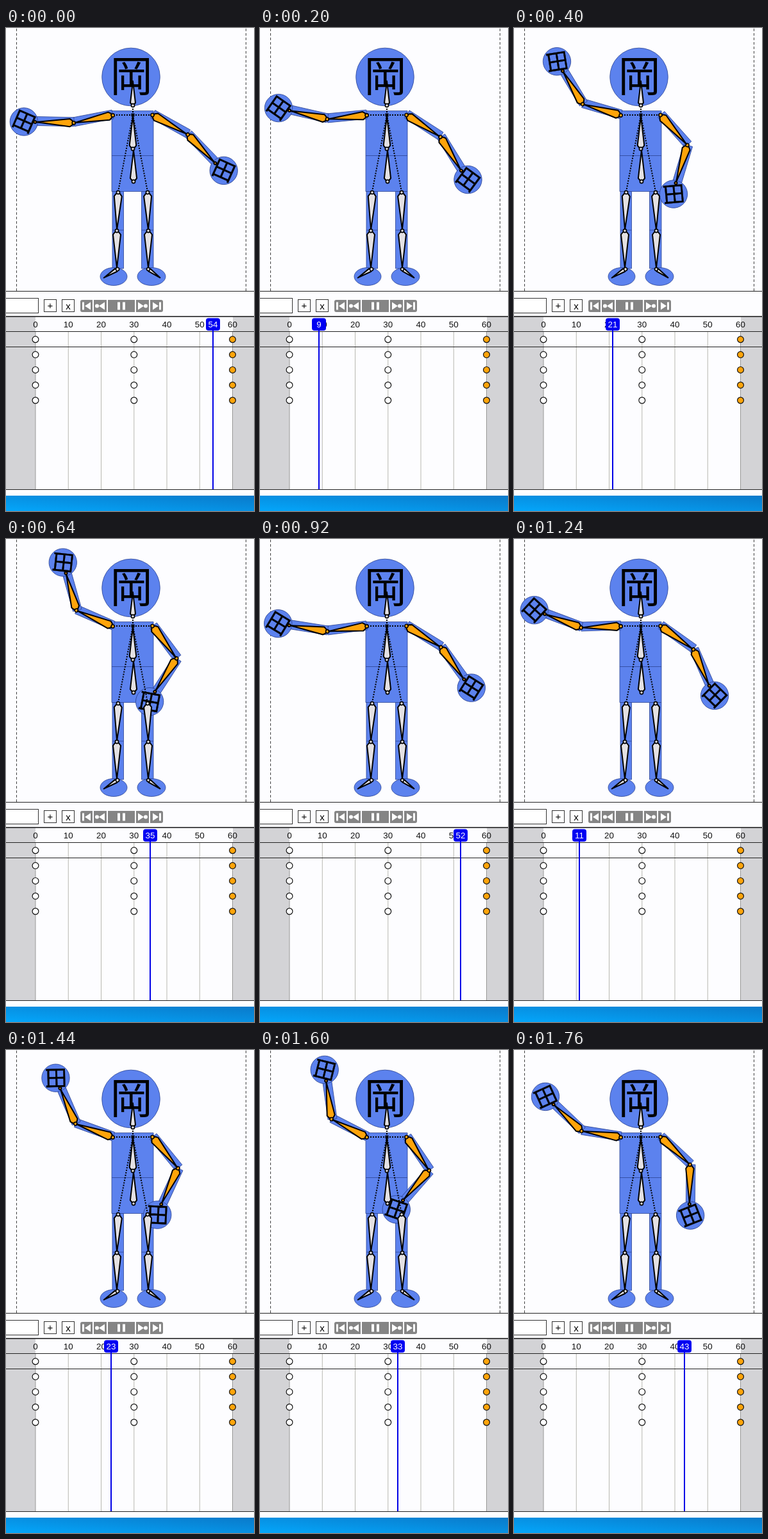
Write an HTML page that moves like this. It is 387 px wide and 755 px high and loops after 1.8 s.

```html
<!DOCTYPE html>
<html lang="ja">
<head>
<meta charset="utf-8">
<title>Bone animation timeline</title>
<style>
  html, body { margin: 0; width: 100%; height: 100%; overflow: hidden; background: #fdfdff; }
  svg { display: block; }
  text { font-family: "Liberation Sans", Arial, sans-serif; font-size: 13.33px; text-anchor: middle; }
  .kanji { font-family: "Noto Sans CJK JP", "Noto Sans CJK", sans-serif; }
  .skin { fill: #5c82ee; stroke: #2c4494; stroke-width: .8; }
  .bone { fill: #e4e1e3; stroke: #000; stroke-width: 2; stroke-linejoin: round; }
  .arm .bone { fill: #ffa40a; }
  .link { fill: none; stroke: #000; stroke-width: 2; stroke-dasharray: 2 2; }
  .box { fill: #fff; stroke: #333; }
  .edge { stroke: #222; }
</style>
</head>
<body>
<svg width="387" height="755" viewBox="0 0 387 755">
  <defs>
    <linearGradient id="sky" x1="0" y1="1" x2="1" y2="0">
      <stop offset="0" stop-color="#04a6fa"/>
      <stop offset="1" stop-color="#0a7aca"/>
    </linearGradient>
  </defs>
  <rect width="387" height="755" fill="#fdfdff"/>
  <path d="M16.5 1V411M374.5 1V411" stroke="#444" stroke-dasharray="4 3"/>

  <g class="skin">
    <circle cx="195" cy="76.5" r="45.3"/>
    <path d="M165 129.5H230V255.5H165ZM165 199.5H230"/>
    <path d="M166 255.5H183.5V376H166ZM166 316H183.5M211.5 255.5H230V376H211.5ZM211.5 316H230"/>
    <ellipse cx="168" cy="388.5" rx="21" ry="14"/>
    <ellipse cx="227" cy="388.5" rx="22" ry="14"/>
  </g>
  <text class="kanji" x="195.5" y="98.5" style="font-size:66px">岡</text>
  <g id="skins"></g>
  <path class="link" d="M198 136H167M198 136H229M198 136L175 256M198 136L221 256M198 122V136"/>
  <rect x="195.5" y="133.5" width="5" height="5"/>
  <g id="bones"></g>

  <path class="edge" d="M0 411.5H387"/>
  <rect class="box" x="-10" y="422.5" width="60.5" height="23"/>
  <rect class="box" x="59.5" y="424.5" width="19" height="19"/>
  <rect class="box" x="87.5" y="424.5" width="19" height="19"/>
  <text x="69" y="439" style="font-size:15px">+</text>
  <text x="97" y="439.5" style="font-size:15px">x</text>
  <path d="M119 425H135V444H119Q116 444 116 441V428Q116 425 119 425ZM137 425h20v19h-20ZM159 425h42v19h-42ZM203 425h20v19h-20ZM225 425h17q3 0 3 3v13q0 3 -3 3h-17Z" fill="#858585"/>
  <g fill="#fff">
    <path d="M119 428.5h3v12h-3ZM132 428.5v12l-9 -6ZM154 428.5v12l-9 -6ZM174 428.5h4v12h-4ZM182 428.5h4v12h-4ZM206 428.5v12l9 -6ZM229 428.5v12l9 -6ZM239 428.5h3v12h-3Z"/>
    <circle cx="142" cy="434.5" r="3"/>
    <circle cx="218" cy="434.5" r="3"/>
  </g>

  <path d="M0 451H46V721H0ZM354 451H387V721H354Z" fill="#d3d3d6"/>
  <g id="grid"></g>
  <path class="edge" d="M0 474.5H387M0 498.5H387M0 721.5H387"/>
  <path d="M0 451H387" stroke="#111" stroke-width="1.6"/>
  <g id="keys"></g>
  <g id="head">
    <path d="M0 470V721" stroke="#0000e6" stroke-width="2"/>
    <rect x="-11" y="453.5" width="22" height="19.5" rx="4" fill="#0000f2"/>
    <text id="count" y="468" fill="#fff"></text>
  </g>
  <rect y="731" width="387" height="24" fill="url(#sky)"/>
</svg>
<script>
const $ = id => document.getElementById(id);

function add(parent, tag, attrs = {}, text = '') {
  const el = document.createElementNS('http://www.w3.org/2000/svg', tag);
  for (const k in attrs) el.setAttribute(k, attrs[k]);
  el.textContent = text;
  parent.append(el);
  return el;
}

// A tapered bone along +x: round joint, wide collar, pointed end.
function bone(parent, len, transform = '') {
  const g = add(parent, 'g', { class: 'bone', transform });
  const w = len * 0.1;
  add(g, 'path', { d: `M2 ${-w / 2}L${w} ${-w}L${len - 2} 0L${w} ${w}L2 ${w / 2}Z` });
  add(g, 'circle', { r: Math.min(2.6, w), 'stroke-width': 1.6 });
}

function boneBetween(x1, y1, x2, y2) {
  const turn = Math.atan2(y2 - y1, x2 - x1) * 180 / Math.PI;
  bone($('bones'), Math.hypot(x2 - x1, y2 - y1), `translate(${x1} ${y1}) rotate(${turn})`);
}

// Angles in degrees below horizontal: value at rest and change per frame.
// The hand sits slightly off the bone's axis by lift.
const arms = [
  { x: 166.7, y: 136.5, flip: -1, upper: 62, fore: 60.5, lift: 0, a: [21.9, -1.82], b: [21.7, -3.84] },
  { x: 228.5, y: 136, flip: 1, upper: 63, fore: 62, lift: -1.5, a: [21.4, 1.28], b: [21.9, 4.04] }
];

function buildArm(arm) {
  const place = { transform: `translate(${arm.x} ${arm.y}) scale(${arm.flip} 1)`, class: 'arm' };
  arm.uppers = [];
  arm.fores = [];
  for (const layer of ['skins', 'bones']) {
    const upper = add(add($(layer), 'g', place), 'g');
    const fore = add(upper, 'g');
    arm.uppers.push(upper);
    arm.fores.push(fore);
    if (layer === 'bones') {
      bone(upper, arm.upper);
      bone(fore, arm.fore);
      add(fore, 'circle', { class: 'bone', cx: arm.fore, r: 2 });
      continue;
    }
    const skin = (parent, width) =>
      add(parent, 'rect', { class: 'skin', y: -8.5, width, height: 14 });
    upper.prepend(skin(upper, arm.upper));
    skin(fore, arm.fore);
    const hand = add(fore, 'g', {
      transform: `translate(${arm.fore + 17.5} ${arm.lift}) rotate(-22) scale(${arm.flip} 1)`
    });
    add(hand, 'circle', { class: 'skin', r: 21.7 });
    add(hand, 'text', {
      class: 'kanji', y: 12.3, style: 'font-size:35px', stroke: '#000', 'stroke-width': 0.4
    }, '田');
  }
}

arms.forEach(buildArm);
boneBetween(198, 121, 198, 81);
boneBetween(198, 189, 198, 136);
boneBetween(199, 240, 199, 189);
boneBetween(175, 257, 173, 317);
boneBetween(173, 317, 173, 377);
boneBetween(221, 257, 222, 317);
boneBetween(222, 317, 222, 377);
boneBetween(174, 377, 151, 391.5);
boneBetween(222, 377, 242, 391.5);

const frameX = f => 46 + f * 5.125;
for (let f = 0; f <= 60; f += 10) {
  const x = frameX(f);
  const edge = f % 60 === 0;
  add($('grid'), 'path', { d: `M${x} 474V721`, stroke: edge ? '#999' : '#b8b8b0' });
  add($('grid'), 'text', { x, y: 468, fill: '#111' }, f);
}
for (const f of [0, 30, 60]) {
  for (let row = 0; row < 5; row++) {
    add($('keys'), 'circle', {
      cx: frameX(f), cy: 486.8 + row * 23.8, r: 4.9,
      fill: f === 60 ? '#ffa40a' : '#fff', stroke: '#111', 'stroke-width': 1.2
    });
  }
}

// The playhead runs slightly faster at the start of each loop.
function frameAt(ms) {
  const f = ms < 200 ? 54 + ms * 0.075 : 69 + (ms - 200) * 0.06027;
  return Math.floor(f + 0.001) % 60;
}

function pose(f) {
  const u = 30 - Math.abs(30 - f);
  for (const { uppers, fores, upper, a, b } of arms) {
    const up = a[0] + a[1] * u;
    const low = b[0] + b[1] * u;
    uppers.forEach(g => g.setAttribute('transform', `rotate(${up})`));
    fores.forEach(g => g.setAttribute('transform', `translate(${upper} 0) rotate(${low - up})`));
  }
  $('head').setAttribute('transform', `translate(${Math.round(frameX(f))} 0)`);
  $('count').textContent = f;
}

const start = performance.now();
function tick() {
  const ms = (performance.now() - start) % 1800;
  pose(frameAt(Math.floor(ms / 40) * 40));
  requestAnimationFrame(tick);
}
tick();
</script>
</body>
</html>
```
